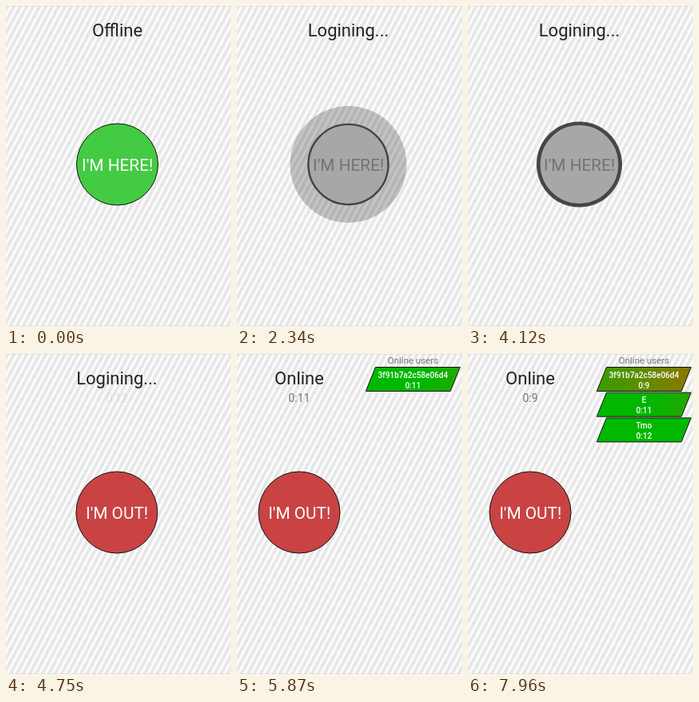
Animation, 282 px wide and 400 px high, one loop 7.99 s. Source, as an HTML page:

```html
<!DOCTYPE html>
<html lang="en">
<head>
<meta charset="utf-8">
<title>Check-in button</title>
<style>
html, body { margin: 0; width: 100%; height: 100%; overflow: hidden; background: #fff; }
svg { display: block; width: 100vw; height: 100vh; font-family: Roboto, "Open Sans", sans-serif; }
text { text-anchor: middle; }
.title { font-size: 22px; fill: #222; }
.action { font-size: 20.8px; }
.timer { font-size: 14px; fill: #777; }
.heading { font-size: 11.5px; fill: #777; }
.user text { font-size: 10px; font-weight: 500; fill: #fff; }
.user path { stroke: #111; }
</style>
</head>
<body>
<svg viewBox="0 0 282 400">
  <defs>
    <pattern id="stripes" width="8" height="400" patternUnits="userSpaceOnUse" patternTransform="skewX(-28)">
      <rect width="8" height="400" fill="#fcfcfc"/>
      <rect width="4.4" height="400" fill="#e7e7e7"/>
    </pattern>
    <clipPath id="slot"><rect x="-140" y="14" width="280" height="30"/></clipPath>
  </defs>
  <rect width="282" height="400" fill="url(#stripes)"/>
  <path d="M0 .5H282M0 399.5H282" stroke="#000" stroke-opacity=".06"/>
  <g id="column">
    <g clip-path="url(#slot)">
      <text id="oldTitle" class="title"/>
      <text id="newTitle" class="title"/>
    </g>
    <text id="timer" class="timer" y="60"/>
    <path id="ring" fill-rule="evenodd"/>
    <circle id="button" cy="198"/>
    <text id="action" class="action" x=".2" y="206"/>
  </g>
  <g id="panel">
    <text class="heading" x="220.5" y="12">Online users</text>
  </g>
  <path id="cursor" d="M.5 .5V16.5L4.2 13L6.7 18.5L9 17.5L6.6 12H11.5Z" fill="#fff" stroke="#000"/>
</svg>
<script>
const LOOP = 7990, LOGIN = 1560, ONLINE = 4590;
const PULSES = [1694, 2202, 2672, 3142, 3612, 4082];
const $ = id => document.getElementById(id);
const NS = "http://www.w3.org/2000/svg";

const span = (t, from, length) => Math.min(1, Math.max(0, (t - from) / length));
const swing = p => 0.5 - Math.cos(p * Math.PI) / 2;
const easeOut = p => 1 - (1 - p) ** 2;
const mix = (a, b, p) => a + (b - a) * p;
const left = (t, born) => "0:" + (12 - Math.max(0, Math.floor((t - born) / 1000)));

function add(parent, tag, attrs, text = "") {
  const el = document.createElementNS(NS, tag);
  set(el, attrs);
  if (text) el.textContent = text;
  parent.append(el);
  return el;
}

function set(el, attrs) {
  for (const key in attrs) el.setAttribute(key, attrs[key]);
}

function write(el, text) {
  if (el.textContent !== text) el.textContent = text;
}

function makeUser(name, born, row) {
  const y = 16.5 + row * 31.7;
  const group = add($("panel"), "g", { class: "user" });
  const fill = add(group, "linearGradient", { id: "heat" + row, gradientUnits: "userSpaceOnUse" });
  add(fill, "stop", { offset: 0, "stop-color": "#00b800" });
  add(fill, "stop", { offset: 0.41, "stop-color": "#8a7800" });
  add(fill, "stop", { offset: 1, "stop-color": "#c80000" });
  add(group, "path", { d: `M173.5 ${y}h106l-12 30h-106z`, fill: `url(#heat${row})` });
  add(group, "text", { x: 220.5, y: y + 13.2 }, name);
  const clock = add(group, "text", { x: 220.5, y: y + 26 });
  return { group, fill, clock, born, row };
}

const users = [
  makeUser("3f91b7a2c58e06d4", ONLINE, 0),
  makeUser("E", 6590, 1),
  makeUser("Tmo", 7400, 2)
];

function drawTitle(t) {
  const second = t >= 4750;
  const p = easeOut(span(t, second ? 4750 : 1600, 400));
  write($("oldTitle"), second ? "Logining..." : "Offline");
  write($("newTitle"), second ? "Online" : "Logining...");
  set($("oldTitle"), { y: 38 - 30 * p, opacity: 1 - p });
  set($("newTitle"), { y: 68 - 30 * p, opacity: p });
}

function drawButton(t) {
  const busy = t >= LOGIN && t < ONLINE;
  const online = t >= ONLINE;
  const color = busy ? "#a7a7a7" : online ? "#c94343" : t >= 1320 ? "#3ab53a" : "#43cb43";
  set($("button"), {
    r: busy ? 50.1 : 51,
    fill: color,
    stroke: busy ? "#444" : "#111",
    "stroke-width": busy ? 2.4 : 1
  });
  write($("action"), online ? "I'M OUT!" : "I'M HERE!");
  set($("action"), { fill: busy ? "#737373" : "#fff" });

  const start = PULSES.filter(s => s <= t).pop();
  if (!busy || start === undefined) return set($("ring"), { opacity: 0 });
  const p = swing(span(t, start, 210));
  const r = mix(51.2, 80.5, p);
  const circle = q => `M${-q} 198a${q} ${q} 0 1 0 ${2 * q} 0a${q} ${q} 0 1 0 ${-2 * q} 0z`;
  set($("ring"), { d: circle(r) + circle(50), opacity: mix(0.75, 0.035, p) });
}

function drawUser({ group, fill, clock, born, row }, t) {
  const age = (t - born) / 1000;
  const x = 161 + 118 * (1.37 - 0.6 * age);
  set(group, { opacity: row ? span(t, born, 250) : 1 });
  set(fill, { x1: x, x2: x + 475 });
  write(clock, left(t, born));
}

function drawCursor(t) {
  const enter = swing(span(t, 280, 510)), leave = span(t, LOGIN, 130);
  const x = mix(21, 134, enter) - 150 * leave;
  set($("cursor"), {
    transform: `translate(${x} ${mix(242, 209, enter)})`,
    visibility: t > 280 && leave < 1 ? "visible" : "hidden"
  });
}

function draw(now) {
  const t = now % LOOP;
  const center = mix(139.5, 78, swing(span(t, 4710, 640)));
  set($("column"), { transform: `translate(${center} 0)` });
  set($("panel"), {
    transform: `translate(${2 * (center - 78)} 0)`,
    visibility: t >= ONLINE ? "visible" : "hidden"
  });
  drawTitle(t);
  drawButton(t);
  write($("timer"), left(t, ONLINE));
  set($("timer"), { opacity: span(t, 4690, 400) });
  users.forEach(user => drawUser(user, t));
  drawCursor(t);
}

const began = performance.now();
function tick() {
  draw(performance.now() - began);
  requestAnimationFrame(tick);
}
tick();
</script>
</body>
</html>
```
